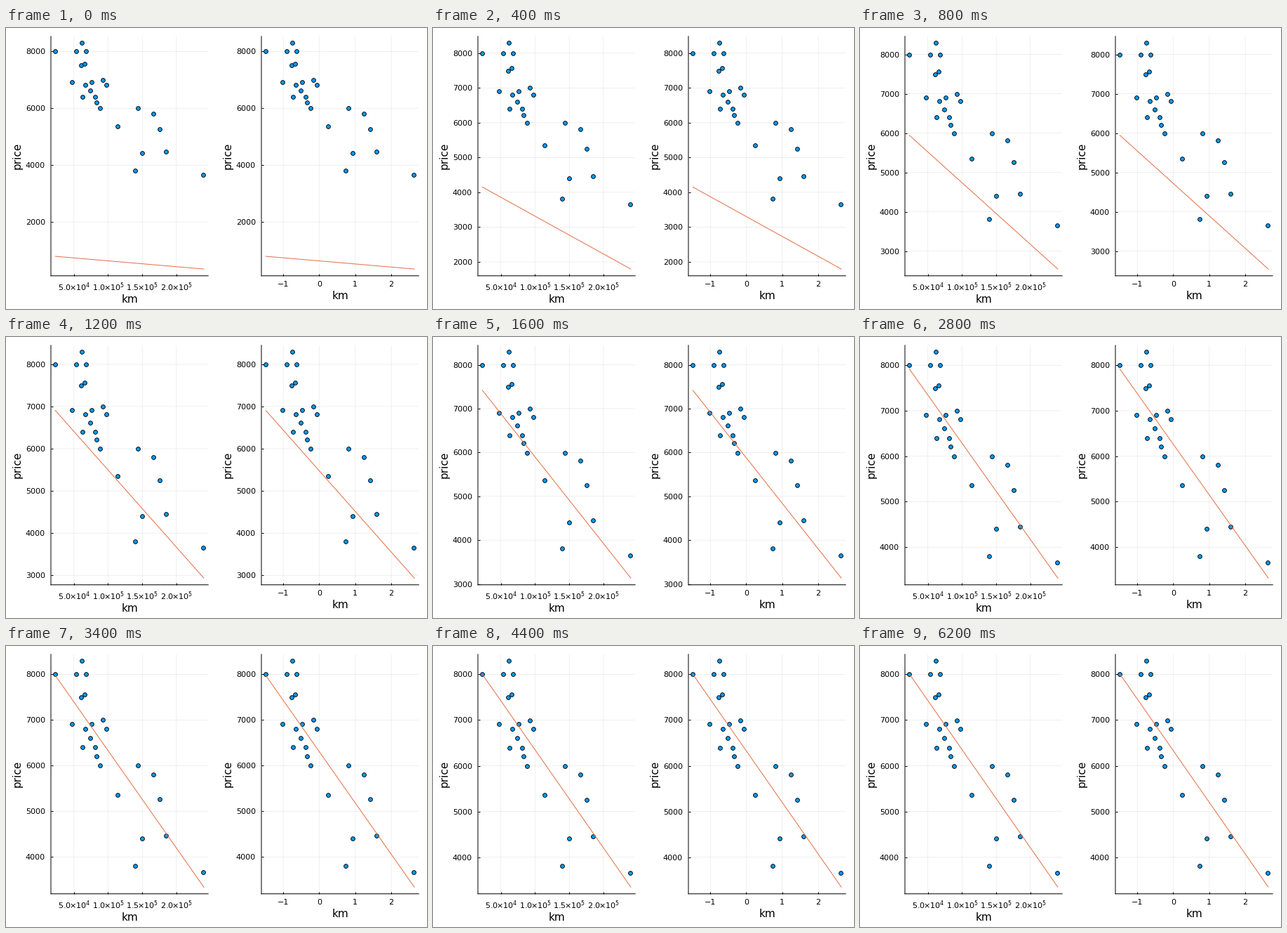
Animation, 600 px wide and 400 px high, one loop 6.67 s. Source, as a matplotlib script:

```python
import numpy as np
import matplotlib.pyplot as plt
from matplotlib.animation import FuncAnimation
from matplotlib.transforms import ScaledTranslation

W, H, DPI = 600, 400, 100
STEPS, LOOP_MS = 100, 6670
FRAMES = 2 * STEPS
RATE = 0.1
BLUE, ORANGE = "#009afa", "#e26f46"
MARGIN, BOTTOM = 3 / 25.4 * DPI, 12 / 25.4 * DPI  # 3 mm and 12 mm
GUTTER = 64

# Asking price -> mileages in thousands of km
CARS = {
    3650: [240], 3800: [139.8], 4400: [150.5], 4450: [185.5], 5250: [176],
    5350: [114.8], 5800: [166.8], 5990: [89, 144.5], 6200: [84],
    6390: [82, 63.1], 6600: [74], 6800: [97.5, 67], 6900: [76, 48.2],
    6990: [93], 7490: [60.9], 7555: [65.7], 7990: [54, 68.5, 22.9],
    8290: [61.8],
}
price, km = np.array([(p, 1000 * k) for p, ks in CARS.items() for k in ks]).T
z = (km - km.mean()) / km.std(ddof=1)
ends = np.array([z.min(), z.max()])


def px(n):
    """Pixels to points."""
    return n * 72 / DPI


def widen(lo, hi):
    pad = 0.03 * (hi - lo)
    return lo - pad, hi + pad


def fit(steps):
    """Intercept and slope after some steps of gradient descent from zero."""
    power = np.mean(z * z)
    bias = price.mean() * (1 - (1 - RATE) ** steps)
    slope = np.mean(z * price) / power * (1 - (1 - RATE * power) ** steps)
    return bias, slope


def sci(t):
    power = int(np.log10(t))
    times = r"\hspace{-0.08}{\times}\hspace{-0.08}"
    return rf"${t / 10 ** power:.1f}{times}10^{{{power}}}$"


def plain(t):
    return f"{t:.0f}".replace("-", "\u2212")


plt.rcParams.update({
    "font.family": "DejaVu Sans",
    "mathtext.fontset": "dejavusans",
    "font.size": 8,
    "axes.linewidth": px(1),
})
fig = plt.figure(figsize=(W / DPI, H / DPI), dpi=DPI, facecolor="white")
# Markers sit on whole pixels, rounded towards the top left
floor_px = ScaledTranslation(-0.5 / DPI, 0.5 / DPI, fig.dpi_scale_trans)


def panel(x0, x, ticks, label, tick_base, title_base):
    left, right = x0 + GUTTER, x0 + W / 2 - MARGIN
    width, height = right - left, H - MARGIN - BOTTOM
    ax = fig.add_axes([left / W, BOTTOM / H, width / W, height / H])
    ax.spines[["top", "right"]].set_visible(False)
    ax.spines[["left", "bottom"]].set_snap(False)
    ax.set_axisbelow(True)
    ax.grid(color="black", alpha=0.1, lw=px(0.6), snap=False)
    ax.tick_params(direction="in", length=px(3), width=px(1))
    ax.tick_params(axis="y", pad=px(8))
    ax.tick_params(axis="x", pad=px(tick_base - (H - BOTTOM)))
    ax.set_xlim(widen(x.min(), x.max()))
    ax.set_xticks(ticks, [label(t) for t in ticks], va="baseline")
    fig.text((left + right) / 2 / W, 1 - title_base / H, "km",
             size=11, ha="center", va="baseline")
    fig.text((x0 + 21) / W, (BOTTOM + height / 2) / H, "price", size=11,
             rotation=90, rotation_mode="anchor", ha="center", va="baseline")
    ax.plot(x, price, "o", ms=px(5.8), mfc=BLUE, mec="black", mew=px(0.9),
            zorder=3, transform=ax.transData + floor_px)
    line, = ax.plot([x.min(), x.max()], [0, 0], color=ORANGE, lw=px(1),
                    zorder=4)
    return ax, line


panels = [
    panel(0, km, np.arange(5e4, 2.1e5, 5e4), sci, 374, 391),
    panel(W / 2, z, range(-1, 3), plain, 368, 386),
]


def update(i):
    # Two ticks per step, so each step is centred on its nominal time
    bias, slope = fit((i + 1) // 2 + 1)
    y = bias + slope * ends
    lo, hi = widen(min(y.min(), price.min()), price.max())
    gap = 2000 if lo < 1000 else 1000
    ticks = np.arange(np.ceil(lo / gap) * gap, hi, gap)
    for ax, line in panels:
        line.set_ydata(y)
        ax.set_yticks(ticks, [plain(t) for t in ticks])
        ax.set_ylim(lo, hi)
    return [line for _, line in panels]


anim = FuncAnimation(fig, update, frames=FRAMES, interval=LOOP_MS / FRAMES,
                     repeat=True, repeat_delay=0, blit=False)
plt.show()
```
